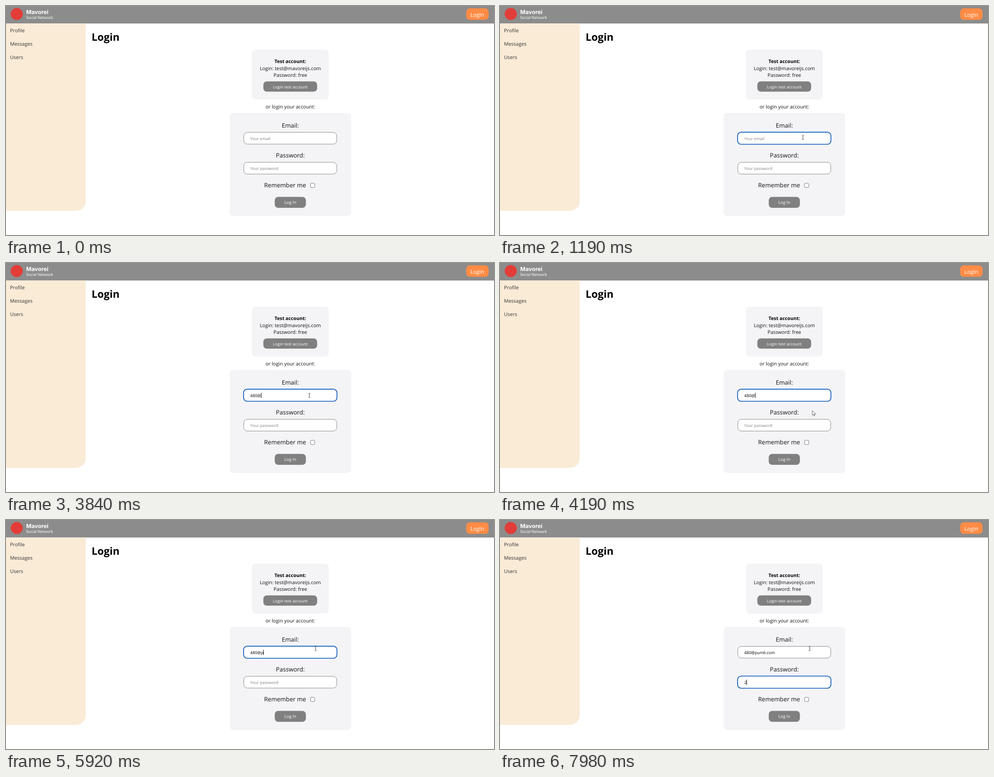
Recreate the animation shown at these times as an HTML page. Size 1089 px wide and 514 px high, loop 8000 ms.

```html
<!DOCTYPE html>
<html lang="en">
<head>
<meta charset="utf-8">
<title>Login</title>
<style>
  html, body { margin: 0; width: 100%; height: 100%; overflow: hidden; background: #fff; }
  svg { display: block; width: 100vw; height: 100vh; }
  text { font-family: "Open Sans", "Noto Sans", sans-serif; font-size: 10.9px; fill: #111; text-rendering: geometricPrecision; white-space: pre; }
  .mid { text-anchor: middle; }
  .nav { font-size: 11px; fill: #333; }
  .label { font-size: 13.5px; }
  .small { font-size: 9.1px; }
  .white { fill: #fff; }
  .bold { font-weight: 700; }
  .card { fill: #f4f4f7; }
  .btn { fill: #808080; }
</style>
</head>
<body>
<svg viewBox="0 0 1089 514" preserveAspectRatio="none">
  <rect width="1089" height="39.3" fill="#8c8c8c"/>
  <circle cx="24" cy="18" r="13.5" fill="#e23d38"/>
  <text x="45" y="17.5" class="white" style="font:700 12.6px Inter,sans-serif">Mavorei</text>
  <text x="45" y="28.6" class="white" style="font:400 9px Lato,sans-serif">Social Network</text>
  <rect x="1027" y="5.3" width="50" height="25.7" rx="8" fill="#ff8c46"/>
  <text x="1051.7" y="23.6" class="mid white" style="font-size:12px">LogIn</text>

  <path d="M0 39.3H178V438a22 22 0 0 1 -22 22H0Z" fill="#faebd7"/>
  <text x="9" y="59.3" class="nav">Profile</text>
  <text x="9" y="88.9" class="nav">Messages</text>
  <text x="9" y="118.5" class="nav">Users</text>
  <text x="191" y="78" class="bold" style="font-size:23px;fill:#000">Login</text>

  <rect x="548.7" y="98" width="171.3" height="112" rx="8" class="card"/>
  <text x="634.5" y="128.4" class="mid bold" style="font-size:10.7px;fill:#000">Test account:</text>
  <text x="634.5" y="143.8" class="mid">Login: test@mavoreijs.com</text>
  <text x="634.5" y="159.2" class="mid">Password: free</text>
  <rect x="574.3" y="169.3" width="120" height="23" rx="7.5" class="btn"/>
  <text x="634.4" y="184.6" class="mid small white">Login test account</text>
  <text x="634.5" y="229.8" class="mid">or login your account:</text>

  <rect x="499.2" y="239.7" width="271" height="231.5" rx="8" class="card"/>
  <text x="634.5" y="272.5" class="mid label">Email:</text>
  <text x="634.5" y="339.8" class="mid label">Password:</text>
  <text x="576" y="406.6" class="label">Remember me</text>
  <rect x="679.5" y="398" width="9.4" height="9.4" rx="1.5" fill="#fff" stroke="#767676"/>
  <rect x="599.7" y="428.5" width="69.5" height="24.5" rx="7.5" class="btn"/>
  <text x="634.4" y="444.3" class="mid white" style="font-size:9.5px">Log In</text>

  <g id="fields"></g>

  <g id="error">
    <rect x="752.3" y="293" width="84.3" height="17.3" rx="8" fill="#f01414"/>
    <rect x="752.3" y="283" width="84.3" height="25.4" rx="8" ry="7" class="card"/>
    <text x="794.3" y="300.8" class="mid" style="font-size:11px">Invalid email</text>
  </g>

  <g id="pointer">
    <circle id="glow" r="8.6" fill="#f6e72e" opacity=".85"/>
    <path id="beam" d="M-2.2 -4.6H-.6M.6 -4.6H2.2M-2.2 4.9H-.6M.6 4.9H2.2M0 -4.2V4.5" fill="none" stroke="#333" stroke-width="1"/>
    <path id="arrow" d="M0 0V10.5L2.5 8.2L4.1 12L5.7 11.3L4.1 7.6H7.5Z" fill="#fff" stroke="#222" stroke-width=".7"/>
  </g>
</svg>
<script>
const LOOP = 8000;
const TEXT_X = 545;
const byId = id => document.getElementById(id);
const show = (el, on) => el.setAttribute('visibility', on ? 'visible' : 'hidden');
const within = (t, a, b) => t >= a && t < b;

function add(parent, tag, attrs) {
  const el = document.createElementNS('http://www.w3.org/2000/svg', tag);
  for (const key in attrs) el.setAttribute(key, attrs[key]);
  return parent.appendChild(el);
}

function makeField(y, hint) {
  const g = byId('fields');
  const box = add(g, 'rect', { fill: '#fff' });
  const text = add(g, 'text', { x: TEXT_X, y: y + 17.2, class: 'small' });
  const caret = add(g, 'rect', { y: y + 7.8, width: 1, height: 11.6, fill: '#000' });

  return (value, focused, caretOn) => {
    const grow = focused ? 0.4 : 0;
    const style = {
      x: 530.6 - grow, y: y + 0.1 - grow,
      width: 207.5 + 2 * grow, height: 26.4 + 2 * grow, rx: 8,
      stroke: focused ? '#1a62bd' : '#858585',
      'stroke-width': focused ? 1.9 : 1
    };
    for (const key in style) box.setAttribute(key, style[key]);
    text.textContent = value || hint;
    text.style.fill = value ? '#000' : '#808080';
    const end = value ? text.getComputedTextLength() : 0;
    caret.setAttribute('x', Math.round(TEXT_X + end));
    show(caret, focused && caretOn);
  };
}

const drawEmail = makeField(283.5, 'Your email');
const drawPassword = makeField(350.7, 'Your password');

// Each key press: time and address length from then on.
const address = '480@pumli.com';
const keys = [[1250, 1], [1380, 2], [1520, 3], [1920, 4], [5850, 5], [6120, 6],
  [6220, 7], [6320, 8], [6510, 9], [6710, 10], [6840, 12], [6910, 13]];

const caretOff = [[1190, 1250], [1720, 1920], [2320, 2780], [3310, 3840], [5250, 5850], [7650, 7980]];

// Pointer moves advance in steps: start, step length, step count, from, to.
const moves = [
  { at: 110, step: 77.5, count: 7, from: [910, 421], to: [676, 295] },
  { at: 3840, step: 75, count: 1, from: [677, 297], to: [681, 306] },
  { at: 3915, step: 75, count: 4, from: [681, 306], to: [700, 336] },
  { at: 4290, step: 75, count: 4, from: [700, 336], to: [691, 288.5] }
];

const clicks = [[652, 730], [4215, 4365], [4720, 4850]];

function pointerAt(t) {
  const move = moves.filter(m => t >= m.at).pop();
  if (!move) return null;
  const p = Math.min(1, Math.floor((t - move.at) / move.step) / move.count);
  const eased = p * p * (3 - 2 * p);
  return move.from.map((v, i) => v + (move.to[i] - v) * eased);
}

function drawPointer(t) {
  const pos = pointerAt(t);
  const overField = pos && within(pos[0], 530, 739) && within(pos[1], 283, 311);
  if (pos) byId('pointer').setAttribute('transform', `translate(${pos})`);
  show(byId('beam'), overField);
  show(byId('arrow'), pos && !overField);
  show(byId('glow'), pos && clicks.some(c => within(t, ...c)));
}

function draw(t) {
  const typed = keys.filter(k => t >= k[0]).pop();
  const caretOn = !caretOff.some(c => within(t, ...c));
  const emailFocus = within(t, 652, 4215) || within(t, 4720, 7110);
  drawEmail(typed ? address.slice(0, typed[1]) : '', emailFocus, caretOn);
  drawPassword(t >= 7980 ? '2' : '', t >= 7110, caretOn);
  show(byId('error'), within(t, 4215, 5920) || within(t, 6710, 6910));
  drawPointer(t);
}

let start;
function tick(now) {
  start ??= now;
  draw((now - start) % LOOP);
  requestAnimationFrame(tick);
}
draw(0);
requestAnimationFrame(tick);
</script>
</body>
</html>
```
